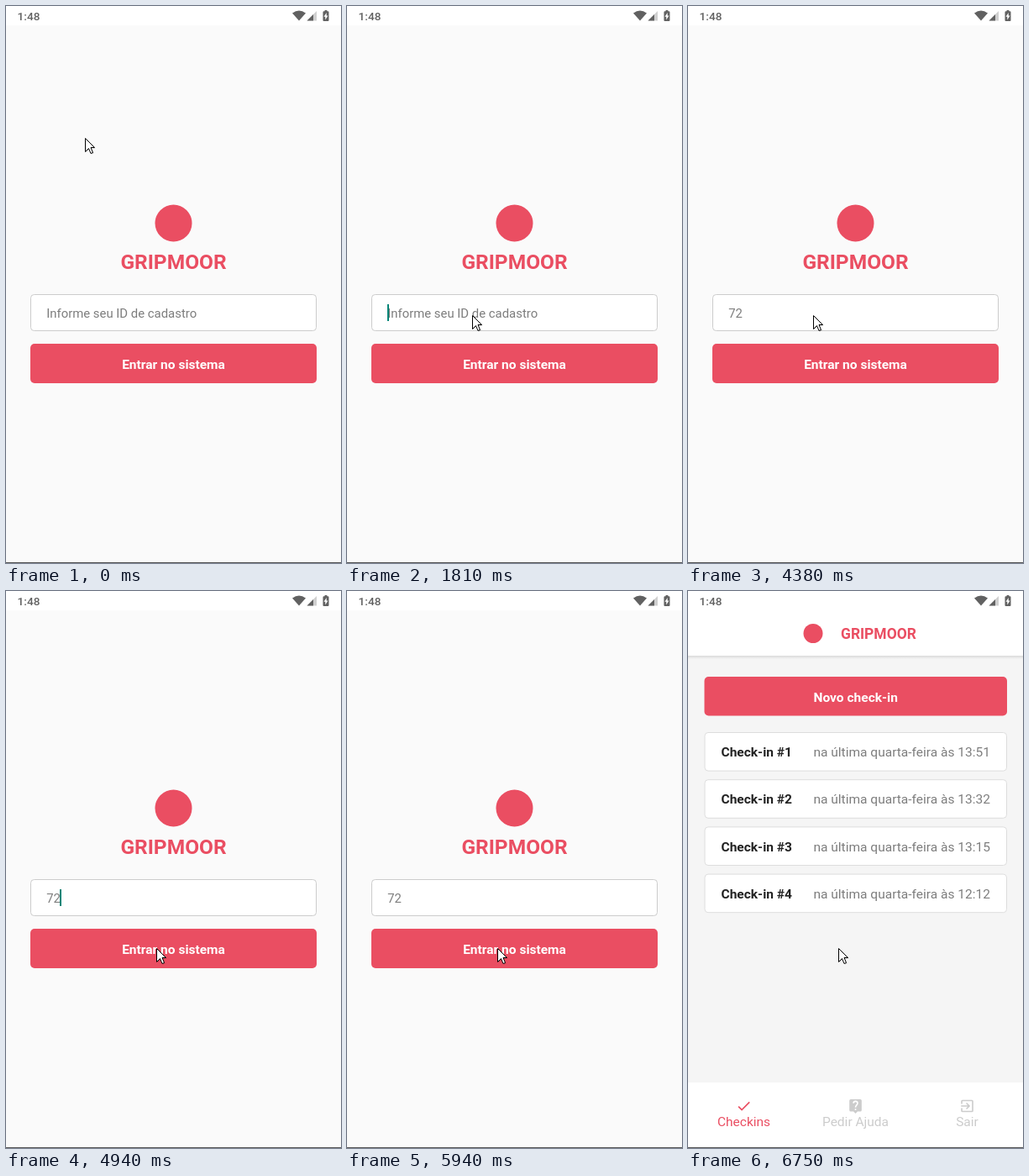
Animation of 399 by 663 pixels, one loop 8000 ms. Source, as an HTML page:

```html
<!DOCTYPE html>
<html lang="pt-BR">
<head>
<meta charset="utf-8">
<title>Check-in</title>
<style>
  html, body { margin: 0; width: 100%; height: 100%; overflow: hidden; background: #fafafa; }
  svg { display: block; width: 399px; height: 663px; font: 15.53px Roboto, sans-serif; --brand: #ea4e62; }
  .brand { fill: var(--brand); }
  .bold { font-weight: 700; }
  .mid { text-anchor: middle; }
  .end { text-anchor: end; }
  .field { font-size: 14.9px; fill: #7d7d7d; }
  .line { fill: none; stroke-width: 2; }

  .anim { animation: 8s step-end infinite; }
  .cursor { animation-name: cursor; }
  .caret { animation-name: caret; }
  .hint { animation-name: hint; }
  .digit1 { animation-name: digit1; }
  .digit2 { animation-name: digit2; }
  .ripple { animation-name: ripple; }
  .home { animation-name: home; }
  .logo { animation-name: logo; }
  .list { animation-name: list; }

  /* Percentages are milliseconds / 80 */
  @keyframes cursor {
    0% { transform: translate(94px, 157px); }
    7% { transform: translate(94px, 157px); animation-timing-function: steps(10, start); }
    14.84% { transform: translate(137px, 339px); animation-timing-function: steps(2, start); }
    16.4% { transform: translate(149px, 368px); }
    56.375% { transform: translate(149px, 368px); animation-timing-function: steps(6, start); }
    62.825%, 100% { transform: translate(179px, 425px); }
  }
  @keyframes caret {
    0% { opacity: 0; transform: translateX(0); }
    22.625% { opacity: 1; transform: translateX(0); }
    28.875% { opacity: 0; transform: translateX(0); }
    36.75% { opacity: 1; transform: translateX(0); }
    39.875% { opacity: 1; transform: translateX(8px); }
    46.875% { opacity: 0; transform: translateX(8px); }
    48.5% { opacity: 1; transform: translateX(16px); }
    54.75% { opacity: 0; transform: translateX(16px); }
    61.75% { opacity: 1; transform: translateX(16px); }
    67.25%, 100% { opacity: 0; transform: translateX(16px); }
  }
  @keyframes hint { 0% { opacity: 1; } 39.875%, 100% { opacity: 0; } }
  @keyframes digit1 { 0% { opacity: 0; } 39.875%, 100% { opacity: 1; } }
  @keyframes digit2 { 0% { opacity: 0; } 48.5%, 100% { opacity: 1; } }
  /* The ripple drifts from the tap towards the button's centre as it grows */
  @keyframes ripple {
    0% { opacity: 0; transform: translate(190.5px, 425.5px) scale(140.5); }
    68.75% { opacity: .125; transform: translate(190.5px, 425.5px) scale(140.5); }
    70.375% { opacity: .125; transform: translate(199.5px, 425.5px) scale(172); }
    71.875%, 100% { opacity: 0; transform: translate(199.5px, 425.5px) scale(172); }
  }
  @keyframes home { 0% { opacity: 0; } 77.375%, 100% { opacity: 1; } }
  @keyframes logo {
    0% { opacity: 0; }
    80.5% { opacity: .25; }
    82% { opacity: .65; }
    83.625%, 100% { opacity: 1; }
  }
  @keyframes list { 0% { opacity: 0; } 84.375%, 100% { opacity: 1; } }
</style>
</head>
<body>
<svg viewBox="0 0 399 663">
  <defs>
    <clipPath id="button"><rect x="29" y="402" width="341" height="47" rx="5"/></clipPath>
    <linearGradient id="shade" x2="0" y2="1">
      <stop stop-color="#dadada"/><stop offset="1" stop-color="#f5f5f5"/>
    </linearGradient>
  </defs>

  <rect width="399" height="663" fill="#fafafa"/>

  <g>
    <circle class="brand" cx="199.5" cy="258.5" r="22"/>
    <text class="brand bold mid" x="199.5" y="313" font-size="24.5">GRIPMOOR</text>
    <rect x="29.5" y="343.5" width="340" height="43" rx="4" fill="#fff" stroke="#ccc"/>
    <text class="field anim hint" x="48.2" y="371">Informe seu ID de cadastro</text>
    <text class="field anim digit1" x="48.2" y="371">7</text>
    <text class="field anim digit2" x="56.6" y="371">2</text>
    <rect class="anim caret" x="48" y="355" width="2" height="20" fill="#008577"/>
    <rect class="brand" x="29" y="402" width="341" height="47" rx="5"/>
    <g clip-path="url(#button)"><circle class="anim ripple" r="1"/></g>
    <text class="bold mid" x="199.5" y="432" fill="#fff">Entrar no sistema</text>
  </g>

  <g class="anim home">
    <rect y="23" width="399" height="640" fill="#f5f5f5"/>
    <rect y="23" width="399" height="55" fill="#fff"/>
    <rect y="77" width="399" height="4" fill="url(#shade)"/>
    <g class="anim logo brand">
      <circle cx="149" cy="50.5" r="11.5"/>
      <text class="bold" x="182" y="56.5" font-size="17.46">GRIPMOOR</text>
    </g>
    <rect class="brand" x="19.5" y="102" width="360.5" height="46.5" rx="5"/>
    <text class="bold mid" x="199.7" y="131.5" fill="#fff">Novo check-in</text>
    <g id="list" class="anim list"></g>

    <rect y="585" width="399" height="78" fill="#fff"/>
    <g class="mid" fill="#ccc">
      <text class="brand" x="66.5" y="637">Checkins</text>
      <text x="199.5" y="637">Pedir Ajuda</text>
      <text x="332.5" y="637">Sair</text>
    </g>
    <path class="line" transform="translate(56.8 603.3) scale(.81)" stroke="var(--brand)" d="M4.1 12.7 9 17.6 20.3 6.3"/>
    <g transform="translate(189.8 603.3) scale(.81)">
      <path fill="#ccc" d="M5 2h14a2 2 0 0 1 2 2v14a2 2 0 0 1-2 2h-4l-3 3-3-3H5a2 2 0 0 1-2-2V4a2 2 0 0 1 2-2z"/>
      <path class="line" stroke="#fff" d="M9 8a3 3 0 0 1 6 0c0 2.5-3 2.8-3 6m0 2v2"/>
    </g>
    <path class="line" transform="translate(322.8 603.3) scale(.81)" stroke="#ccc"
      d="M4 9V5a1 1 0 0 1 1-1h14a1 1 0 0 1 1 1v14a1 1 0 0 1-1 1H5a1 1 0 0 1-1-1v-4M3 12h12M10.8 7.7l4.3 4.3-4.3 4.3"/>
  </g>

  <rect width="399" height="23" fill="#fff"/>
  <g fill="#616161">
    <text x="13.6" y="17" font-size="13.6" font-weight="500">1:48</text>
    <path d="M341 8.6Q349 2.6 357 8.6L349 17.5z"/>
    <path fill="#cfcfcf" d="M370 6v11.5h-11.5z"/>
    <path d="M366 10v7.5h-7.5z"/>
    <path d="M379.6 5h2.8v1.3h1.1a1 1 0 0 1 1 1v9.7a1 1 0 0 1-1 1h-5a1 1 0 0 1-1-1V7.3a1 1 0 0 1 1-1h1.1z"/>
    <path fill="#fff" d="M381.7 8v3.5h1.8l-3.200 5v-3.800h-1.800z"/>
  </g>
  <rect y="662" width="399" height="1" fill="#5c5c5c"/>

  <g class="anim cursor">
    <path d="M1.5 1.5V17.5l4-4 2.500 6 2.500-1-2.500-6h4.500z" opacity=".18"/>
    <path d="M.5.5V16.500l4-4 2.500 6 2.500-1-2.500-6h4.500z" fill="#fff" stroke="#000"/>
  </g>
</svg>
<script>
  const times = ["13:51", "13:32", "13:15", "12:12"];
  document.getElementById("list").innerHTML = times.map((time, i) => `
    <g transform="translate(0 ${168 + i * 56.2})">
      <rect x="20" y=".5" width="359.5" height="45.6" rx="4" fill="#fff" stroke="#ddd"/>
      <text class="bold" x="39.5" y="29.3" fill="#222">Check-in #${i + 1}</text>
      <text class="end" x="360" y="29.3" fill="#7d7d7d">na última quarta-feira às ${time}</text>
    </g>`).join("");
</script>
</body>
</html>
```
